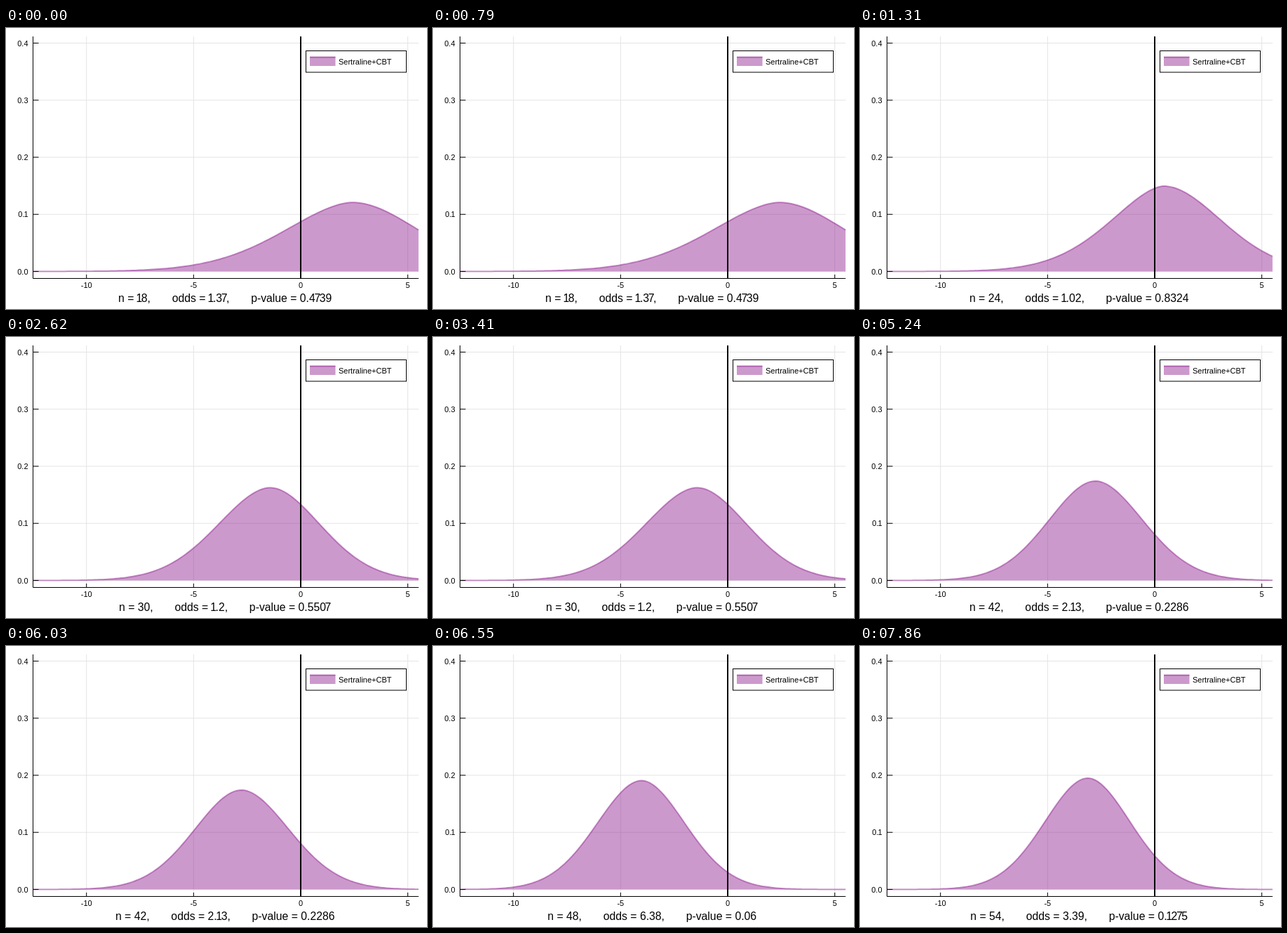
Write an HTML page that moves like this. It is 600 px wide and 400 px high and loops after 8 s.

```html
<!DOCTYPE html>
<html lang="en">
<head>
<meta charset="utf-8">
<title>Density by sample size</title>
<style>
  html, body { margin: 0; width: 100%; height: 100%; overflow: hidden; background: #fff; }
  svg { display: block; width: 600px; height: 400px; }
  text { font: 11px "Liberation Sans", Arial, sans-serif; fill: #000; }
  #caption { font-size: 15.75px; text-anchor: middle; }
  .grid { stroke: #e4e4e4; stroke-width: 1; }
  .axis { stroke: #000; stroke-width: 1; fill: none; }
  .area { fill: rgba(128, 0, 128, .4); }
  .line { fill: none; stroke: rgba(128, 0, 128, .4); stroke-width: 2; }
</style>
</head>
<body>
<svg viewBox="0 0 600 400">
  <path id="grid" class="grid"/>
  <path id="area" class="area"/>
  <path id="line" class="line"/>
  <path d="M420 12V356" stroke="#000" stroke-width="2"/>
  <path id="axes" class="axis"/>
  <g id="labels"></g>
  <rect x="427.5" y="32.5" width="143" height="30.5" fill="#fff" stroke="#000"/>
  <rect class="area" x="433" y="41" width="36.5" height="13"/>
  <path class="line" d="M433 41.5H469.5"/>
  <text x="474" y="52">Sertraline+CBT</text>
  <text id="caption" x="312.2" y="390"></text>
</svg>
<script>
const $ = id => document.getElementById(id);
const LOOP = 8000, STEP = 1310;
const LEFT = 38.5, RIGHT = 588;
const toX = v => 420 + v * 30.53;
const toY = p => 346.5 - p * 812.5;

// Each density is a bell: its mode, peak, width to either side and left falloff
const states = [
  { odds: '1.37', p: '0.4739', mode: 2.43, peak: .1209, left: 4.57, right: 4.39, power: 1.77 },
  { odds: '1.02', p: '0.8324', mode: .43, peak: .1495, left: 3.61, right: 3.8, power: 1.72 },
  { odds: '1.2', p: '0.5507', mode: -1.42, peak: .1625, left: 3.49, right: 3.32, power: 1.88 },
  { odds: '1.19', p: '0.5769', mode: -1.37, peak: .1575, left: 3.61, right: 3.45, power: 1.93 },
  { odds: '2.13', p: '0.2286', mode: -2.77, peak: .1742, left: 3.11, right: 3.18, power: 1.92 },
  { odds: '6.38', p: '0.06', mode: -4.02, peak: .1908, left: 2.97, right: 2.91, power: 1.92 },
  { odds: '3.39', p: '0.1275', mode: -3.12, peak: .1951, left: 2.88, right: 2.84, power: 1.93 }
];

function density(v, { mode, peak, left, right, power }) {
  const d = v - mode;
  return peak * Math.exp(-(d < 0 ? (-d / left) ** power : (d / right) ** 1.9));
}

// The digits 1 and 7 sit tight against their neighbours
function setText(el, s) {
  const tight = c => /[17]/.test(c || '') ? -.088 : 0;
  el.textContent = s;
  el.setAttribute('dx', [...s].map((c, i) => (i ? tight(c) + tight(s[i - 1]) : 0) + 'em').join(' '));
}

function addLabel(s, x, y, anchor) {
  const el = document.createElementNS('http://www.w3.org/2000/svg', 'text');
  el.setAttribute('x', x);
  el.setAttribute('y', y);
  el.setAttribute('text-anchor', anchor);
  $('labels').append(el);
  return el;
}

function drawAxes() {
  let grid = '', axes = `M${LEFT} 12V356.5H${RIGHT}`;
  for (let v = -10; v <= 5; v += 5) {
    const x = toX(v);
    grid += `M${x} 12V356`;
    axes += `M${x} 356V351`;
    addLabel(v, x, 370, 'middle').textContent = v;
  }
  for (let i = 0; i < 5; i++) {
    const y = toY(i / 10);
    grid += `M38 ${y}H${RIGHT}`;
    axes += `M38 ${y}H46.5`;
    setText(addLabel(i, 31.5, y + 4, 'end'), (i / 10).toFixed(1));
  }
  $('grid').setAttribute('d', grid);
  $('axes').setAttribute('d', axes);
}

function show(i) {
  const s = states[i], pts = [];
  for (let v = -12.5; v <= 5.5; v += .125) pts.push(`${toX(v)} ${toY(density(v, s))}`);
  const d = 'M' + pts.join('L');
  $('line').setAttribute('d', d);
  $('area').setAttribute('d', `${d}V${toY(0)}H${LEFT}Z`);
  const gap = '\u00a0'.repeat(7);
  setText($('caption'), `n = ${18 + 6 * i},${gap}odds = ${s.odds},${gap}p-value = ${s.p}`);
}

let current = -1;
function tick() {
  const i = Math.floor(performance.now() % LOOP / STEP);
  if (i !== current) show(current = i);
  requestAnimationFrame(tick);
}

drawAxes();
tick();
</script>
</body>
</html>
```
